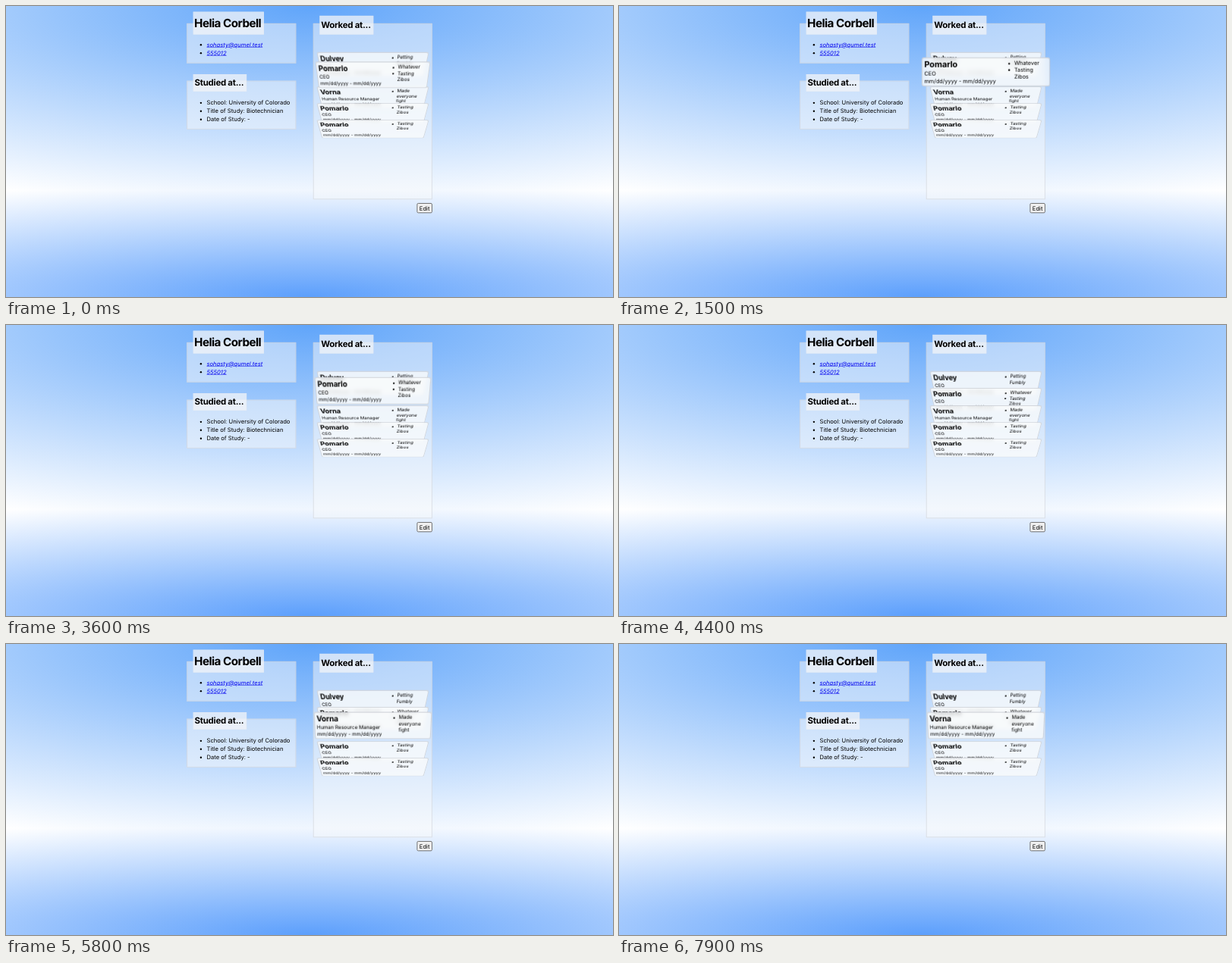
Animation of 800 by 384 pixels, one loop 8 s. Source, as an HTML page:

```html
<!DOCTYPE html>
<html lang="en">
<head>
<meta charset="utf-8">
<title>Résumé cards</title>
<style>
html, body { margin: 0; width: 100%; height: 100%; overflow: hidden; }
body {
  background:
    radial-gradient(960px 268px at 400px 0, #60a5fa, #fff) 0 0 / 100% 243px no-repeat,
    radial-gradient(960px 155px at 400px 100%, #5c9ffc, #fff) 0 243px / 100% 141px no-repeat;
}
div { position: absolute; box-sizing: border-box; white-space: nowrap; }
#page, #deck {
  left: 0; top: 0; width: 1680px; height: 806px;
  font: 16px/20px Inter, sans-serif; font-optical-sizing: none; color: #000;
  text-rendering: geometricPrecision;
}
#page { transform: scale(.47619); transform-origin: 0 0; }
#deck { zoom: .47619; perspective: 430px; perspective-origin: 1015px 334px; }
.panel { background: rgba(248, 250, 252, .5); border: 2px solid rgba(200, 205, 212, .55); }
.legend { background: rgba(244, 246, 249, .74); border: 1px solid rgba(225, 230, 238, .6); }
.h1 { font-size: 32px; font-weight: 700; letter-spacing: -.036em; }
.h2 { font-size: 24px; font-weight: 700; letter-spacing: -.022em; }
.h3 { font-size: 19.2px; font-weight: 700; letter-spacing: -.01em; }
.small { font-size: 12.8px; }
.link { font-style: italic; color: #00e; }
.link span { text-decoration: underline; }
.item::before {
  content: ""; position: absolute; left: -19px; top: 8px;
  width: 5px; height: 5px; border-radius: 50%; background: #000;
}
.small.item::before { left: -14px; width: 4px; height: 4px; }
.button {
  background: #f0f0f0; border: 2px solid #6c6c6c; border-radius: 4px;
  text-align: center; line-height: 24px;
}
.card {
  overflow: hidden; border-radius: 6px;
  background: rgba(250, 251, 252, .76); border: 1px solid rgba(185, 190, 198, .6);
  backdrop-filter: blur(6px);
}
</style>
</head>
<body>
<div id="page"></div>
<div id="deck"></div>
<script>
const page = document.getElementById('page');
const deck = document.getElementById('deck');

function add(parent, cls, x, y, w, h) {
  const el = document.createElement('div');
  el.className = cls;
  el.style.left = x + 'px';
  el.style.top = y + 'px';
  if (w) { el.style.width = w + 'px'; el.style.height = h + 'px'; }
  parent.append(el);
  return el;
}

// One line of text, centred vertically on cy
function line(parent, cls, x, cy, text) {
  const span = document.createElement('span');
  span.textContent = text;
  add(parent, cls, x, cy - 10).append(span);
}

add(page, 'panel', 500, 48, 303, 111);
add(page, 'legend', 518, 16, 196, 63);
line(page, 'h1', 521, 47, 'Helia Corbell');
line(page, 'item link', 555.5, 107, 'sohasty@qumel.test');
line(page, 'item link', 555.5, 130, '555012');

add(page, 'panel', 500, 207, 303, 135);
add(page, 'legend', 518, 189, 148, 48);
line(page, 'h2', 522, 213, 'Studied at...');
['School: University of Colorado', 'Title of Study: Biotechnician', 'Date of Study: -']
  .forEach((s, i) => line(page, 'item', 555.5, 268 + 23 * i, s));

add(page, 'panel', 850, 48, 330, 488);
add(page, 'legend', 868, 27, 149, 52);
line(page, 'h2', 872, 53, 'Worked at...');
add(page, 'button', 1137, 546, 43, 28).textContent = 'Edit';

const jobs = [
  ['Dulvey', 'CEO', '*Petting', 'Fumbly'],
  ['Pomarlo', 'CEO', '*Whatever', '*Tasting', 'Zibos'],
  ['Vorna', 'Human Resource Manager', '*Made', 'everyone', 'fight'],
  ['Pomarlo', 'CEO', '*Tasting', 'Zibos'],
  ['Pomarlo', 'CEO', '*Tasting', 'Zibos']
];
const cards = jobs.map(([name, role, ...tasks], i) => {
  const card = add(deck, 'card', 867, 131 + 44.3 * i, 296, 66.5);
  line(card, 'h3', 4, 16, name);
  line(card, 'small', 4, 38, role);
  line(card, 'small', 4, 55, 'mm/dd/yyyy - mm/dd/yyyy');
  tasks.forEach((s, k) => {
    const first = s[0] === '*';
    line(card, first ? 'small item' : 'small', 211, 12 + 16 * k, first ? s.slice(1) : s);
  });
  return card;
});

const { PI, sin, cos, exp, abs, min, max } = Math;

function ramp(t, from, to) {
  const u = min(1, max(0, (t - from) / (to - from)));
  return u * u * (3 - 2 * u);
}

// How far the second card is out: a short hop, a full lift, a slow return
function secondOut(t) {
  if (t < 850) return .7 * sin(PI * (t + 115) / 965);
  return ramp(t, 1050, 1450) * (1 - .5 * ramp(t, 2500, 2900)) * (1 - ramp(t, 3300, 4300));
}

// The third card rises, then sways half-way out
function thirdOut(t) {
  return ramp(t, 4400, 4750) * (.61 - .1 * cos(2 * PI * (t - 5800) / 2100));
}

// Damped swing as the second card jumps forward
function swing(t) {
  const s = t - 1100;
  return s < 0 ? 0 : -90 * exp(-s / 170) * sin(2 * PI * s / 400);
}

// Cards tilt upright and arc upwards on their way out
function pose(card, out, extra = 0) {
  const tilt = out < .5 ? 40 - 64 * out : 16 * (1 - out);
  const lift = extra - 19 * (1 - abs(2 * out - 1));
  card.style.transform = `translate3d(0, ${lift}px, ${72 * out}px) rotateX(${-tilt}deg)`;
  card.style.zIndex = out > .02 ? 2 : 1;
}

cards.forEach(card => pose(card, 0));

function frame() {
  // The picture advances in steps of a tenth of a second
  const t = Math.floor(performance.now() % 8000 / 100) * 100;
  pose(cards[1], secondOut(t), swing(t));
  pose(cards[2], thirdOut(t));
  requestAnimationFrame(frame);
}
frame();
</script>
</body>
</html>
```
